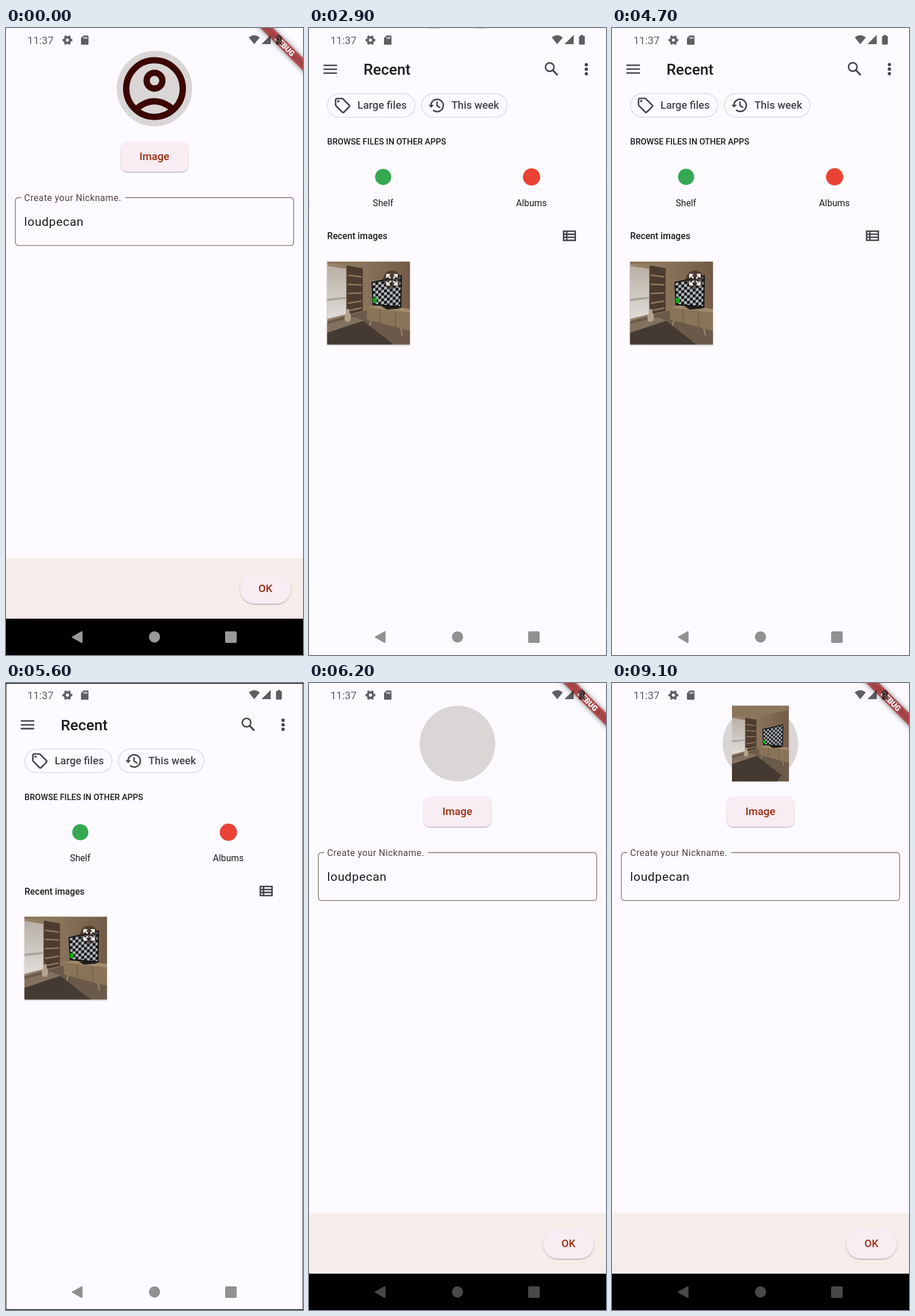
An HTML page for the animation above (9.2 s loop, 515x1087 px).

```html
<!DOCTYPE html>
<html lang="en">
<head>
<meta charset="utf-8">
<title>Profile picture picker</title>
<style>
  html, body { margin: 0; width: 100%; height: 100%; overflow: hidden; background: #000; }
  svg { display: block; }
  #stage { width: 100%; height: 100%; }
  text { font-family: Roboto, sans-serif; fill: #1c1b1d; }
  .medium { font-weight: 500; }
  .mid { text-anchor: middle; }
  .small { font-size: 15.7px; }
  .label { font-size: 18.3px; }
  .action { font-size: 18.3px; font-weight: 500; letter-spacing: .13px; fill: #9b2d10; text-anchor: middle; }
  .raised { fill: #f8edf2; filter: url(#lift); }
  .line { fill: none; stroke: #46464a; stroke-width: 2.6; }
</style>
</head>
<body>
<svg id="stage" viewBox="0 0 515 1087">
  <defs>
    <filter id="lift" x="-20%" y="-20%" width="140%" height="150%">
      <feDropShadow dx="0" dy="1.3" stdDeviation="1" flood-color="#000" flood-opacity=".32"/>
    </filter>
    <filter id="blur" x="-50%" y="-100%" width="200%" height="300%">
      <feGaussianBlur stdDeviation="4.5"/>
    </filter>
    <pattern id="checker" width="10" height="10" patternUnits="userSpaceOnUse" patternTransform="translate(79 60) skewY(-8)">
      <path fill="#15171a" d="M0 0h10v10H0z"/>
      <path fill="#b4b7ba" d="M0 0h5v5H0zM5 5h5v5H5z"/>
    </pattern>
    <linearGradient id="wall">
      <stop offset="0" stop-color="#9a866d"/>
      <stop offset="1" stop-color="#725b47"/>
    </linearGradient>
    <linearGradient id="daylight" x2="0" y2="1">
      <stop offset="0" stop-color="#b9b0a5"/>
      <stop offset="1" stop-color="#e0dcd8"/>
    </linearGradient>
    <!-- Living room: window, shelf, screen on a sideboard, rug -->
    <symbol id="room" viewBox="0 0 144 191" overflow="visible">
      <path fill="url(#wall)" d="M0 0h144v191H0z"/>
      <path fill="#8b755b" d="M0 0h144v10L62 29 0 27z"/>
      <path fill="#6b5a49" d="M0 127 66 109l78 34v48H0z"/>
      <path fill="url(#daylight)" d="M0 31 33 36v79L0 123z"/>
      <path fill="#aaa198" d="M0 88 33 85v3L0 92z"/>
      <path fill="#4c3c2f" d="M34 30 62 35v74l-28 7z"/>
      <path fill="none" stroke="#90795f" stroke-width="2.5" d="M36 47 60 50M36 63 60 64M36 79 60 78M36 96 60 92M36 109 60 104"/>
      <path fill="#453a31" d="M0 148 62 126l64 50-12 15H0z"/>
      <path fill="#837160" d="M0 132 46 120l18 6L0 147z"/>
      <path fill="#a18b6d" d="M69 103 98 99l46 7v7l-38-1z"/>
      <path fill="#8a7459" d="M69 103 144 112v32L69 124z"/>
      <path fill="none" stroke="#655240" d="M92 106v24M119 110v27"/>
      <path fill="none" stroke="#a18b6d" stroke-width="2" d="M76 125l-2 10M128 139l3 13"/>
      <path fill="#211c19" d="M94 101h24l9 4-23 2z"/>
      <path fill="#111315" d="M77 59 130 47l-1 57-50-5z"/>
      <path fill="url(#checker)" d="M79 61 128 50l-1 51-46-4z"/>
      <path fill="#05ad14" d="M79 87 86 86v9l-6 1z"/>
      <path fill="#b3a28c" d="M34 106h4l1 6q5 7 0 16h-7q-4-8 1-16z"/>
    </symbol>
  </defs>

  <g id="app">
    <path fill="#fcfaff" d="M0 0h515v920H0z"/>
    <path fill="#f6ecea" d="M0 919h515v106H0z"/>
    <path d="M0 1024h515v63H0z"/>
    <circle cx="257.5" cy="105" r="65.5" fill="#d9d6d5"/>
    <g id="person" transform="translate(257.5 105)" fill="none" stroke="#3b0700" stroke-width="10.9">
      <circle r="49.1"/>
      <circle cy="-13.7" r="13.7"/>
      <path d="M-31 35Q-16 22 0 22T31 35"/>
    </g>
    <use id="photo" href="#room" x="208" y="39.5" width="98.6" height="131"/>
    <rect class="raised" x="199.5" y="197" width="116" height="52" rx="10"/>
    <rect id="ripple" x="199.5" y="197" width="116" height="52" rx="10" fill="#9b2d10"/>
    <text class="action" x="257.3" y="229">Image</text>
    <path fill="none" stroke="#85736e" stroke-width="1.3" d="M26.500 294H21.500a5.200 5.200 0 0 0-5.200 5.200V372a5.200 5.200 0 0 0 5.200 5.200H493.500a5.200 5.200 0 0 0 5.200-5.200V299.200a5.200 5.200 0 0 0-5.200-5.200H206.500"/>
    <text class="small" x="31.500" y="299.500" letter-spacing=".49" style="fill:#53433f">Create your Nickname.</text>
    <text x="31.500" y="343" font-size="21" letter-spacing=".65">loudpecan</text>
    <rect class="raised" x="406" y="946" width="88" height="52" rx="26"/>
    <text class="action" x="450" y="978">OK</text>
    <g transform="translate(515 0) rotate(45)">
      <path id="band" filter="url(#blur)" opacity=".5" d="M-75 36.700H75v15.700H-75z"/>
      <path fill="#b71c1c" opacity=".63" d="M-75 36.700H75v15.700H-75z"/>
      <text class="mid" y="49.300" font-size="13.4" font-weight="900" style="fill:#fff">DEBUG</text>
    </g>
  </g>

  <g id="picker">
    <path fill="#fdfbff" d="M0 0h515v1087H0z"/>
    <path class="line" d="M25 64.500H48.500M25 71.300H48.500M25 78H48.500"/>
    <text class="medium" x="94.500" y="81" font-size="26.2">Recent</text>
    <g class="line">
      <circle cx="417.500" cy="67.500" r="7.400"/>
      <path d="M422.500 72.500 431 81.500" stroke-width="3.200"/>
    </g>
    <path stroke="#46464a" stroke-width="5.800" stroke-linecap="round" d="M481 63.300h.01M481 71.200h.01M481 79.100h.01"/>
    <g fill="none" stroke="#d9d8dd" stroke-width="1.300">
      <rect x="32" y="113.500" width="151.500" height="41" rx="20.500"/>
      <rect x="195" y="113.500" width="148.500" height="41" rx="20.500"/>
    </g>
    <g class="line" stroke-width="2.400">
      <path stroke-linejoin="round" d="M46 124.500q0-2.500 2.500-2.500H57q1 0 2 1L69.500 133.500q1.500 1.500 0 3L60.500 145.500q-1.500 1.500-3 0L47 135q-1-1-1-2z"/>
      <circle cx="50.700" cy="126.700" r=".8"/>
      <path d="M211.500 134A10.700 10.700 0 1 1 215 142M222 127.500V134.500L227.500 138"/>
      <path fill="#46464a" stroke="none" d="M207 133h9.500l-4.700 5z"/>
    </g>
    <g class="medium label">
      <text x="84" y="140" style="fill:#444347">Large files</text>
      <text x="247" y="140" style="fill:#444347">This week</text>
    </g>
    <text class="medium" x="31.500" y="202.300" font-size="14.5">BROWSE FILES IN OTHER APPS</text>
    <circle cx="128.500" cy="258" r="14" fill="#34a853"/>
    <circle cx="386" cy="258" r="15" fill="#ea4335"/>
    <text class="small mid" x="128.300" y="308.500">Shelf</text>
    <text class="small mid" x="385.800" y="308.500">Albums</text>
    <text class="small medium" x="31.500" y="366.300">Recent images</text>
    <path class="line" stroke-width="2.300" d="M441.500 352.200h20.300v15.800H441.500zM441.500 357.500h20.300M441.500 362.700h20.300M447 352v16"/>
    <rect class="raised" x="31.300" y="405" width="143.700" height="143.500"/>
    <svg x="31.300" y="405" width="143.700" height="143.500" viewBox="0 23.500 144 144" preserveAspectRatio="none">
      <use href="#room" width="144" height="191"/>
    </svg>
    <circle cx="143.700" cy="436" r="15.500" fill="#33231c" opacity=".6"/>
    <path fill="none" stroke="#fff" stroke-width="2.300" d="M135 433v-5.500h5.500M135 427.500l6.500 6.500M147 427.500h5.500v5.500M152.500 427.500l-6.500 6.500M135 439.500v5.500h5.500M135 445l6.500-6.500M147 445h5.500v-5.500M152.500 445l-6.500-6.500"/>
  </g>

  <path id="blackout" d="M0 0h515v1087H0z"/>

  <g id="status" opacity=".62">
    <text class="label" x="37" y="27.500" style="fill:#000">11:37</text>
    <g fill="none" stroke="#000">
      <circle cx="106.500" cy="21" r="4.700" stroke-width="4"/>
      <circle cx="106.500" cy="21" r="7.500" stroke-width="2.200" pathLength="12" stroke-dasharray="1 1" stroke-dashoffset=".5"/>
    </g>
    <path fill-rule="evenodd" d="M134.500 13H141.500q1.500 0 1.500 1.500V27.500q0 1.500-1.500 1.500H131.500q-1.500 0-1.500-1.500V17.500zM134.500 15.500v3.200h1.400v-3.200zM137 15.500v3.200h1.400v-3.200zM139.500 15.500v3.200h1.400v-3.200z"/>
    <path d="M430.500 28 421 16.500Q430.500 8.500 440 16.500zM443 28 459 12V28z"/>
    <path d="M471 12h4.500v2H477q1.300 0 1.300 1.300V27.500q0 1.300-1.300 1.300H469.500q-1.300 0-1.300-1.300V15.300q0-1.300 1.300-1.300H471z"/>
  </g>
  <g id="nav">
    <path d="M115 1056 131.700 1046.700v18.600z" stroke="currentColor" stroke-width="2" stroke-linejoin="round"/>
    <circle cx="257.500" cy="1055.700" r="9.700"/>
    <rect x="380" y="1046" width="20" height="20" rx="2"/>
  </g>
</svg>
<script>
const LOOP = 9200;
const OPEN = 2600, CLOSE = 5600, BLACK = 5700, RETURN = 6200, PHOTO = 6500;

const part = id => document.getElementById(id);
const [app, picker, person, photo, ripple, blackout, status, nav] =
  ["app", "picker", "person", "photo", "ripple", "blackout", "status", "nav"].map(part);

const ramp = (t, from, to) => Math.min(1, Math.max(0, (t - from) / (to - from)));
const easeOut = p => 1 - (1 - p) ** 4;
const show = (node, visible) => node.style.display = visible ? "" : "none";
const zoom = (node, s) =>
  node.setAttribute("transform", `translate(257.5 543.5) scale(${s}) translate(-257.5 -543.5)`);

function draw(t) {
  const opening = easeOut(ramp(t, OPEN, OPEN + 400));
  const closing = t >= CLOSE && t < BLACK;
  const inPicker = t >= OPEN && t < BLACK;
  const dark = t >= BLACK && t < RETURN;

  show(app, t < OPEN + 400 || t >= RETURN);
  zoom(app, t < RETURN ? 1 + .15 * opening : 1);
  show(person, t < BLACK);
  show(photo, t >= PHOTO);
  ripple.setAttribute("opacity", .1 * (ramp(t, 1500, 1700) - ramp(t, 2000, 2300)));

  show(picker, inPicker);
  zoom(picker, closing ? .9975 : .85 + .15 * opening);
  picker.setAttribute("opacity", ramp(t, OPEN, OPEN + 100));

  show(blackout, dark);
  show(status, !dark);
  const navColor = inPicker ? "#919191" : t < OPEN ? "#999" : "#484848";
  nav.setAttribute("fill", navColor);
  nav.setAttribute("color", navColor);
}

function tick() {
  draw(performance.now() % LOOP);
  requestAnimationFrame(tick);
}
tick();
</script>
</body>
</html>
```
